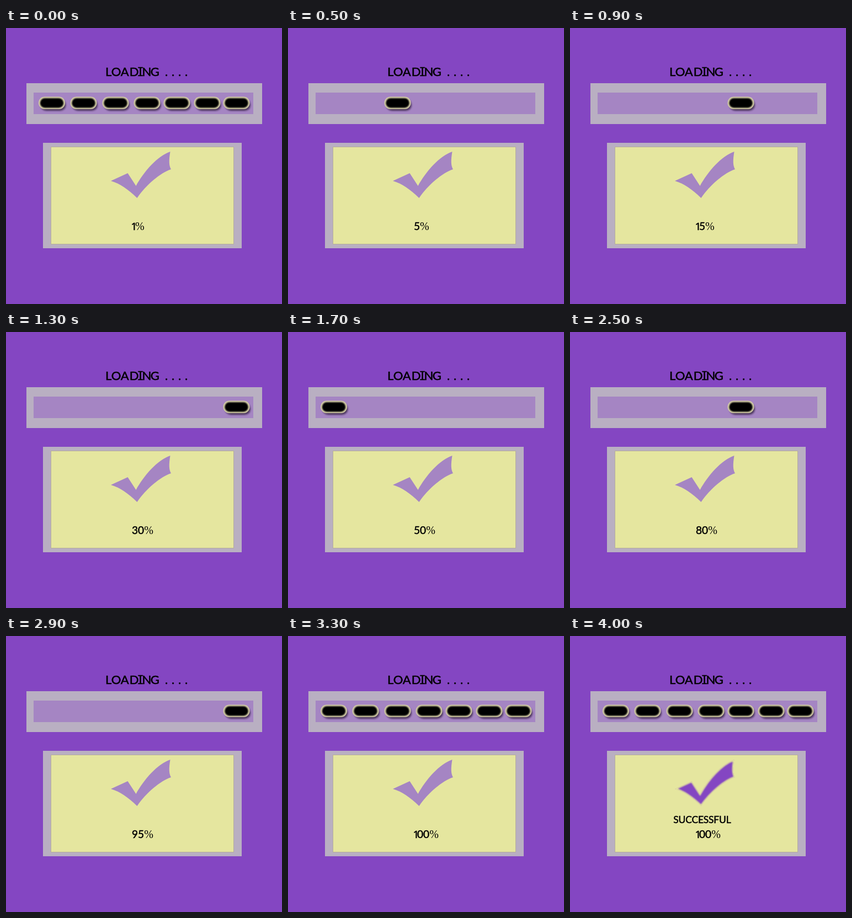
An HTML page that plays this animation: 500 by 500 pixels, repeating every 4400 ms.

```html
<!DOCTYPE html>
<html lang="en">
<head>
<meta charset="utf-8">
<title>Loading</title>
<style>
  html, body { margin: 0; width: 100%; height: 100%; overflow: hidden; background: #8446c2; }
  svg { display: block; width: 100%; height: 100%; }
  text { font-family: Lato, sans-serif; stroke: #000; stroke-width: .5; }
  .slab { font-family: "Noto Sans Mono", monospace; }
  .one { font-family: "Open Sans", sans-serif; }
  .sign { font-family: "Liberation Serif", serif; font-size: 20px; stroke: none; }
</style>
</head>
<body>
<svg viewBox="0 0 500 500">
  <defs>
    <path id="tick" d="M190 277L220.500 263L235.500 286C250 260 274 232 297.500 224C295 240 295 249 299 256C280 262 254 284 237.500 308C222 293 207 282 190 277Z"/>
    <clipPath id="tickClip"><use href="#tick"/></clipPath>
    <filter id="edge" x="-20%" y="-40%" width="140%" height="180%"><feGaussianBlur stdDeviation=".7"/></filter>
    <filter id="soft" x="-20%" y="-40%" width="140%" height="180%"><feGaussianBlur stdDeviation="1.2"/></filter>
    <filter id="shade" x="-20%" y="-50%" width="140%" height="200%"><feGaussianBlur stdDeviation="1.7"/></filter>
    <g id="pill">
      <rect x="5.500" y="129" width="46" height="21" rx="10.500" fill="#1c1028" opacity=".65" filter="url(#shade)"/>
      <rect x="2" y="124.500" width="48" height="22.500" rx="11" fill="#d6cfa8" filter="url(#edge)"/>
      <rect x="4.800" y="127.300" width="42.400" height="17.200" rx="8.500" filter="url(#soft)"/>
    </g>
  </defs>

  <rect width="500" height="500" fill="#8446c2"/>
  <text y="86.500" font-size="22" x="180 190.700 207.700 223.700">LOAD<tspan class="slab" x="237">I</tspan><tspan x="246.500 261.800">NG</tspan><tspan x="288 300 312 324">....</tspan></text>

  <rect x="37" y="100" width="427" height="74" fill="#b9afc2"/>
  <rect x="50" y="117" width="398" height="39" fill="#a585c3"/>
  <g id="pills"></g>

  <rect x="67" y="208" width="360" height="191" fill="#b9afc2"/>
  <rect x="81.500" y="215.500" width="331" height="176" fill="#e5e69f" stroke="#b5ad9c"/>

  <use id="idle" href="#tick" fill="#a585c3"/>
  <g id="done" clip-path="url(#tickClip)">
    <use href="#tick" fill="#8446c2"/>
    <use href="#tick" fill="none" stroke="#e5e69f" stroke-width="4" filter="url(#soft)"/>
  </g>
  <text id="success" x="187.300" y="338.600" font-size="17.400" letter-spacing="-.15">SUCCESSFUL</text>
  <text id="percent" y="365.600" font-size="19"></text>
</svg>
<script>
  const LOOP = 4400, ALL = -1;
  const PILL_X = [57, 114.5, 172.5, 229.5, 283.5, 338.5, 391.5];

  // [start ms, lit pill, percent]
  const STEPS = [
    [0, ALL, 1], [300, 1, 3], [500, 2, 5], [700, 3, 10], [900, 4, 15],
    [1100, 5, 20], [1300, 6, 30], [1500, ALL, 40], [1700, 0, 50],
    [1900, 1, 50], [2100, 2, 50], [2300, 3, 70], [2500, 4, 80],
    [2700, 5, 90], [2900, 6, 95], [3100, ALL, 99], [3300, ALL, 100]
  ];

  const $ = id => document.getElementById(id);
  const show = (el, on) => el.setAttribute("visibility", on ? "visible" : "hidden");

  $("pills").innerHTML = PILL_X.map(x => `<use href="#pill" x="${x}"/>`).join("");
  const pills = [...$("pills").children];

  // The digit 1 is narrow; all other digits share one width.
  function percentMarkup(value) {
    let x = 228;
    const digits = [...String(value)].map(d => {
      const one = d === "1";
      const span = `<tspan class="${one ? "one" : "digit"}" x="${one ? x - 1.5 : x}">${d}</tspan>`;
      x += one ? 6 : 11.1;
      return span;
    });
    return digits.join("") + `<tspan class="sign" x="${x}">%</tspan>`;
  }

  let shown;
  function render(t) {
    const [, lit, value] = STEPS.findLast(step => step[0] <= t);
    pills.forEach((pill, i) => show(pill, lit === ALL || lit === i));
    if (value !== shown) $("percent").innerHTML = percentMarkup(shown = value);
    show($("success"), t >= 3600);
    show($("idle"), t < 4000);
    show($("done"), t >= 4000);
  }

  const start = performance.now();
  function tick() {
    render((performance.now() - start) % LOOP);
    requestAnimationFrame(tick);
  }
  tick();
</script>
</body>
</html>
```
